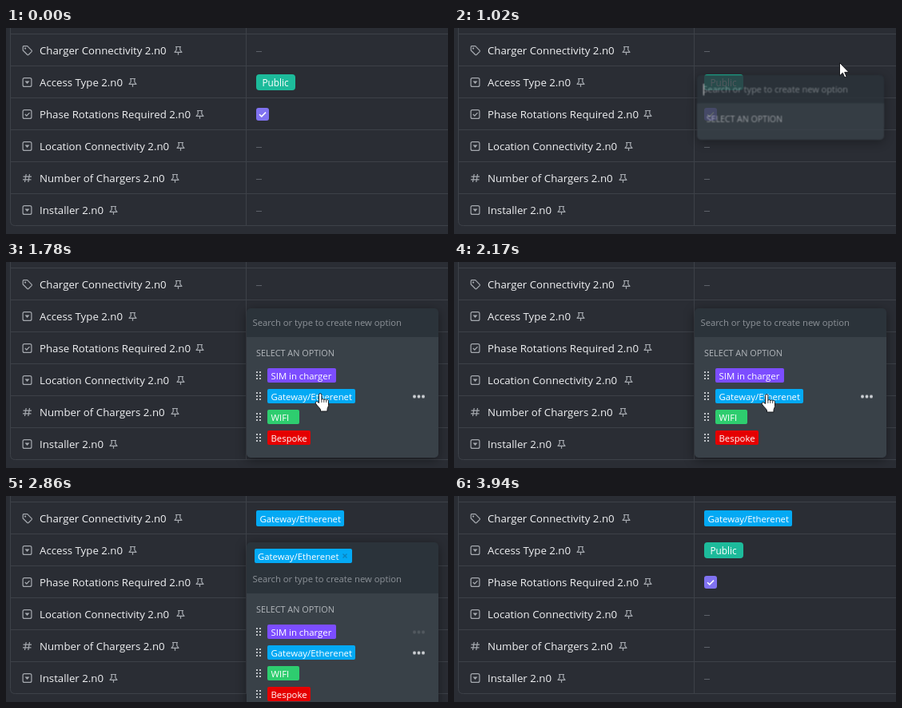
These frames come from a looping animation (553 by 258 pixels, 4.73 s). An HTML page:

```html
<!DOCTYPE html>
<html lang="en">
<head>
<meta charset="utf-8">
<title>Custom fields</title>
<style>
html, body { margin: 0; width: 100%; height: 100%; overflow: hidden; background: #2a2d34; }
svg { display: block; }
text { font: 13.25px "Open Sans", "Noto Sans", sans-serif; fill: #f0f1f3; }
.tag text { font-size: 11.35px; fill: #fff; }
.tag .public { font-size: 11.8px; }
.search { font-size: 11.25px; fill: #8e9399; }
.heading { font-size: 10.87px; fill: #b3b7bc; }
.line { fill: none; stroke: #3d4148; }
.icon { fill: none; stroke: #a6aab0; stroke-width: 1.2; stroke-linejoin: round; }
.solid { fill: #a6aab0; stroke: none; }
.dash { fill: #5d6169; }
.more { fill: #d0d3d7; }

/* One loop is 4730 ms; 1% = 47.3 ms */
.anim { animation: 4730ms step-end infinite; }
#cursor { animation-name: move; visibility: hidden; }
#hand { animation-name: hand; }
#arrow { animation-name: arrow; visibility: hidden; }
#hover { animation-name: hover; visibility: hidden; }
#menu { animation-name: menu; opacity: 0; transform-origin: 421px 98px; }
#shade { filter: drop-shadow(0 3px 7px rgba(0, 0, 0, .4)); }
#slide { animation-name: slide; }
#body { animation-name: grow; }
#list { animation-name: list; visibility: hidden; }
#caret { animation-name: caret; visibility: hidden; }
#picked { animation-name: picked; opacity: 0; }
#value { animation-name: value; visibility: hidden; }
#empty { animation-name: empty; }
#more1 { animation-name: more1; opacity: 0; }
#more2 { animation-name: more2; opacity: 0; }

@keyframes move {
  0% { visibility: hidden; transform: translate(545px, 215px); }
  4.22% { visibility: visible; transform: translate(545px, 215px); animation-timing-function: steps(5); }
  11.62% { visibility: visible; transform: translate(455px, 34px); animation-timing-function: steps(2); }
  14.37% { visibility: visible; transform: translate(453px, 30px); }
  17.33% { visibility: visible; transform: translate(458px, 33px); animation-timing-function: steps(3); }
  21.56% { visibility: visible; transform: translate(482px, 43px); animation-timing-function: steps(4); }
  27.27% { visibility: visible; transform: translate(470px, 74px); animation-timing-function: steps(7); }
  37.63% { visibility: visible; transform: translate(393px, 164px); }
  38.9% { visibility: visible; transform: translate(388px, 166px); }
  40.38% { visibility: visible; transform: translate(387px, 165px); }
  44.6% { visibility: visible; transform: translate(391px, 165px); animation-timing-function: steps(4); }
  50.1% { visibility: visible; transform: translate(430px, 166px); animation-timing-function: steps(3); }
  54.54% { visibility: visible; transform: translate(533px, 170px); animation-timing-function: steps(3); }
  58.98% { visibility: visible; transform: translate(535px, 181px); }
  60.46%, 100% { visibility: hidden; transform: translate(535px, 181px); }
}
@keyframes hand { 20.29% { visibility: hidden; } 33.19% { visibility: inherit; } }
@keyframes arrow { 20.29% { visibility: inherit; } 33.19% { visibility: hidden; } }
@keyframes hover {
  0% { visibility: hidden; transform: translateY(200px); }
  4.22% { visibility: visible; transform: translateY(200px); animation-timing-function: steps(5); }
  11.62% { visibility: visible; transform: none; }
  18.81%, 100% { visibility: hidden; transform: none; }
}
@keyframes menu {
  0% { opacity: 0; transform: scale(.96); }
  20.29% { opacity: .4; transform: scale(.96); }
  21.56% { opacity: .82; transform: scale(.975); }
  22.83% { opacity: .95; transform: scale(.99); }
  24.31% { opacity: 1; transform: none; }
  77.8% { opacity: .72; transform: scale(.99); }
  79.28% { opacity: .4; transform: scale(.975); }
  80.76% { opacity: .15; transform: scale(.965); }
  83.29%, 100% { opacity: 0; transform: scale(.96); }
}
@keyframes slide {
  0% { transform: none; }
  48.83% { transform: translateY(2px); }
  50.1% { transform: translateY(6px); }
  51.58% { transform: translateY(17px); }
  53.06% { transform: translateY(25px); }
  54.54%, 100% { transform: translateY(28px); }
}
@keyframes grow { 0% { height: 47px; } 22.83%, 100% { height: 151px; } }
@keyframes list { 22.83%, 100% { visibility: inherit; } }
@keyframes caret { 20.29% { visibility: inherit; } 31.71% { visibility: hidden; } }
@keyframes picked { 51.58% { opacity: .4; } 53.06%, 100% { opacity: 1; } }
@keyframes value { 53.06%, 100% { visibility: visible; } }
@keyframes empty { 53.06%, 100% { visibility: hidden; } }
@keyframes more1 {
  33.19% { opacity: .5; }
  34.67% { opacity: 1; }
  36.15% { opacity: .6; }
  37.63% { opacity: 0; }
  51.58% { opacity: .5; }
  53.06% { opacity: 1; }
  58.98% { opacity: .6; }
  60.46%, 100% { opacity: .17; }
}
@keyframes more2 {
  36.15% { opacity: .5; }
  37.63% { opacity: 1; }
  51.58% { opacity: .6; }
  53.06% { opacity: .2; }
  54.54% { opacity: 0; }
  57.5% { opacity: .3; }
  58.98% { opacity: .7; }
  60.46%, 100% { opacity: 1; }
}
</style>
</head>
<body>
<svg width="553" height="258" viewBox="0 0 553 258">
  <defs>
    <g id="pin" class="icon">
      <path d="M-3.5-4.5h7M-2.3-4.5v4L-4.5 2.3h9L2.3-.5v-4M0 2.5v3.3"/>
    </g>
    <g id="select" class="icon">
      <rect x="-5.4" y="-5.4" width="10.8" height="10.8" rx="2"/>
      <path class="solid" d="M-3-1.5h6L0 2z"/>
    </g>
    <g id="check" class="icon">
      <rect x="-5.4" y="-5.4" width="10.8" height="10.8" rx="2"/>
      <path d="M-2.7 0l2 2L3-1.8"/>
    </g>
    <g id="label" class="icon">
      <path d="M-5.3-4.3q0-1 1-1H.2L5.6.2q.6.7 0 1.4L1.6 5.5q-.7.6-1.4 0L-5.3 0z"/>
      <circle class="solid" cx="-2.4" cy="-2.4" r="1.1"/>
    </g>
    <path id="hash" class="icon" d="M-1.3-5L-3 5M3-5L1.3 5M-5-1.8H5.5M-5.5 1.8H5"/>
    <rect id="dash" class="dash" x="313" y="29" width="7" height="1"/>
    <path id="grip" d="M314-5V5M318-5V5" fill="none" stroke="#c0c3c8" stroke-width="2" stroke-dasharray="2"/>
    <g id="more" class="more">
      <circle cx="511" r="2"/><circle cx="516.5" r="2"/><circle cx="522" r="2"/>
    </g>
  </defs>

  <rect width="553" height="258" fill="#2a2d34"/>

  <g id="hover" class="anim">
    <rect x="301.5" y="8.5" width="256" height="38" fill="#31353c" stroke="#4c5058"/>
    <rect class="line" x="268.5" y="16.5" width="23" height="22" rx="3" style="stroke:#5a5e66"/>
    <path class="icon" d="M275 33l.8-3.4 7-7q.8-.7 1.6 0l1 1q.7.8 0 1.6l-7 7zM281.3 24.2l2.5 2.5"/>
  </g>

  <path class="line" d="M5.5 0V241.5Q5.5 247.5 11.5 247.5H553M300.5 0V247M6 7.5H553M6 47.5H553M6 87.5H553M6 127.5H553M6 167.5H553M6 207.5H553"/>

  <use href="#label" x="26.5" y="28"/>
  <text x="42" y="33">Charger Connectivity 2.n0</text>
  <use href="#pin" x="215.5" y="28"/>
  <use href="#select" x="26.5" y="68"/>
  <text x="42" y="73">Access Type 2.n0</text>
  <use href="#pin" x="158.5" y="68"/>
  <use href="#check" x="26.5" y="108"/>
  <text x="42" y="113">Phase Rotations Required 2.n0</text>
  <use href="#pin" x="242.5" y="108"/>
  <use href="#select" x="26.5" y="148"/>
  <text x="42" y="153">Location Connectivity 2.n0</text>
  <use href="#pin" x="218.5" y="148"/>
  <use href="#hash" x="26.5" y="188"/>
  <text x="42" y="193">Number of Chargers 2.n0</text>
  <use href="#pin" x="211.5" y="188"/>
  <use href="#select" x="26.5" y="228"/>
  <text x="42" y="233">Installer 2.n0</text>
  <use href="#pin" x="134.5" y="228"/>

  <use id="empty" class="anim" href="#dash"/>
  <use href="#dash" y="120"/>
  <use href="#dash" y="160"/>
  <use href="#dash" y="200"/>
  <g class="tag">
    <rect x="313" y="58" width="49" height="20" rx="4" fill="#1dbb9b"/>
    <text class="public" x="320.5" y="73">Public</text>
    <rect x="313" y="100" width="16" height="16" rx="3" fill="#8072f0"/>
    <path d="M317 108.2l2.8 2.7 5.2-5.3" fill="none" stroke="#fff" stroke-width="1.5"/>
  </g>
  <g id="value" class="tag anim">
    <rect x="313" y="18" width="110" height="20" rx="2" fill="#04a9f4"/>
    <text x="317.5" y="33">Gateway/Etherenet</text>
  </g>

  <g id="menu" class="anim">
    <g id="shade">
      <rect x="301" y="58" width="240" height="70" rx="5" fill="#2b333a"/>
      <g id="slide" class="anim">
        <rect x="301" y="94" width="240" height="12" fill="#394148"/>
        <rect id="body" class="anim" x="301" y="94" width="240" height="151" rx="5" fill="#394148"/>
        <text class="search" x="308.5" y="80">Search or type to create new option</text>
        <rect id="caret" class="anim" x="309" y="69" width="1" height="15" fill="#fff"/>
        <text class="heading" x="313" y="118">SELECT AN OPTION</text>
        <g id="list" class="tag anim">
          <use href="#grip" y="142"/>
          <rect x="327" y="133" width="86" height="18" rx="2" fill="#7c4dff"/>
          <text x="331.5" y="147">SIM in charger</text>
          <use href="#grip" y="168"/>
          <rect x="327" y="159" width="110" height="18" rx="2" fill="#04a9f4"/>
          <text x="331.5" y="173">Gateway/Etherenet</text>
          <use href="#grip" y="194"/>
          <rect x="327" y="185" width="40" height="18" rx="2" fill="#2ecd6f"/>
          <text x="331.5" y="199">WIFI</text>
          <use href="#grip" y="220"/>
          <rect x="327" y="211" width="54" height="18" rx="2" fill="#e50000"/>
          <text x="331.5" y="225">Bespoke</text>
          <use id="more1" class="anim" href="#more" y="142.5"/>
          <use id="more2" class="anim" href="#more" y="168.5"/>
        </g>
      </g>
      <g id="picked" class="tag anim">
        <rect x="311" y="66" width="122" height="18" rx="2" fill="#04a9f4"/>
        <text x="315" y="80">Gateway/Etherenet</text>
        <path d="M421.5 72.5l5 5m0-5l-5 5" stroke="#0b83bd" stroke-width="1.4"/>
      </g>
    </g>
  </g>

  <g id="cursor" class="anim" fill="#fff" stroke="#16181c" stroke-linejoin="round">
    <g id="hand" class="anim" transform="translate(-7 0)">
      <path d="M5.5 12.5V2.4a1.7 1.7 0 0 1 3.4 0V8.500a1.5 1.5 0 0 1 2.9.4 1.5 1.5 0 0 1 2.9.5 1.5 1.5 0 0 1 2.8 1V15.500c0 2-1.5 3.2-1.5 5v2.500H7.5v-2.200C6 18 3 16 1.3 13a1.6 1.6 0 0 1 2.5-1.9z"/>
      <path d="M8.9 8.500v3.500M11.8 9v3M14.7 9.500V12" fill="none" stroke-width=".8"/>
    </g>
    <path id="arrow" class="anim" d="M.5.500v16.300l3.800-3.500 2.500 5.700 2.400-1-2.500-5.600h5.300z"/>
  </g>
</svg>
</body>
</html>
```
